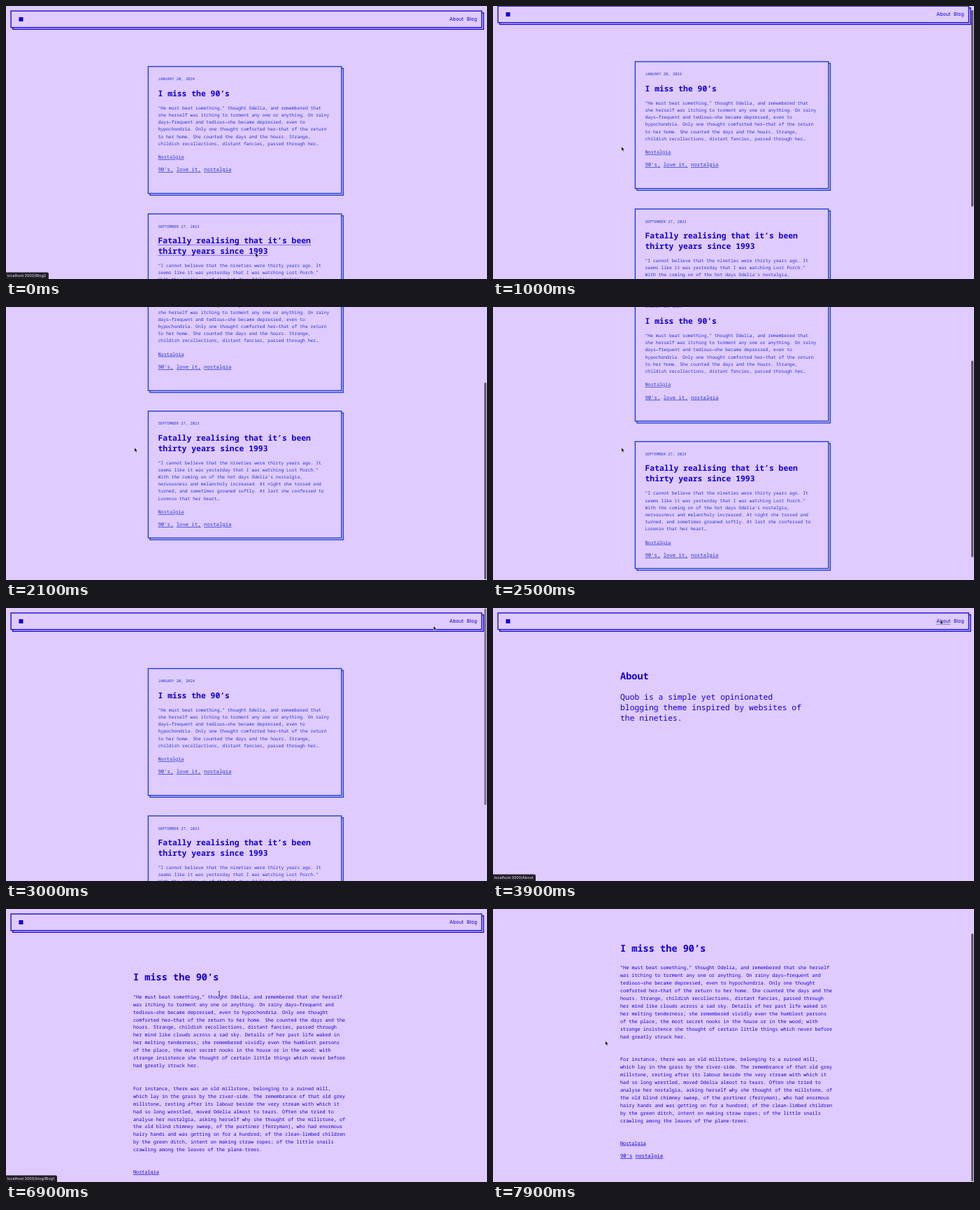
An HTML page that plays this animation: 688x390 px, repeating every 8 s.

```html
<!DOCTYPE html>
<html lang="en">
<head>
<meta charset="utf-8">
<title>Blog theme walkthrough</title>
<style>
  html, body { margin: 0; width: 100%; height: 100%; overflow: hidden; background: #dfcbfe; }
  svg { display: block; width: 100vw; height: 100vh; text-rendering: geometricPrecision; }
  text { font-family: "Noto Sans Mono", "DejaVu Sans Mono", monospace; fill: #1400d2; }
  .card text { fill: #2536cf; }
  .card .title { fill: #1400d2; }
  .title { font-weight: 600; }
  .link { text-decoration: underline; text-decoration-thickness: .6px; }
  .sans { font-family: Inter, "Liberation Sans", sans-serif; }
  .frame { fill: #dfcbfe; stroke: #1a10d2; stroke-width: 1.4; }
  .card .frame { stroke: #2040ce; }
  .dots { stroke: #1400d2; stroke-width: .9; stroke-dasharray: .9 .9; }
</style>
</head>
<body>
<svg id="stage" viewBox="0 0 688 390" preserveAspectRatio="none"></svg>
<script>
const LOOP = 8000, STEP = 100, EM = 0.6;
const stage = document.getElementById("stage");

function add(parent, tag, attrs = {}, content) {
  const el = document.createElementNS("http://www.w3.org/2000/svg", tag);
  for (const key in attrs) el.setAttribute(key, attrs[key]);
  if (content !== undefined) el.textContent = content;
  parent.appendChild(el);
  return el;
}
const group = (parent, cls = "") => add(parent, "g", { class: cls });

function write(parent, x, y, size, content, cls = "") {
  return add(parent, "text", { x, y, "font-size": size, class: cls }, content);
}
function writeLines(parent, x, y, size, leading, lines, cls) {
  lines.forEach((line, i) => line && write(parent, x, y + i * leading, size, line, cls));
}
function writeTags(parent, x, y, tags) {
  const size = 7.29;
  for (const tag of tags) {
    write(parent, x, y, size, tag, "link");
    x += (tag.length + 1) * size * EM;
  }
}
function dots(parent, x, y, width) {
  add(parent, "line", { x1: x, x2: x + width, y1: y, y2: y, class: "dots" });
}
function doubleFrame(parent, x, y, width, height) {
  for (const d of [2.6, 0])
    add(parent, "rect", { x: x + d, y: y + d, width, height, class: "frame" });
}

function header(parent) {
  doubleFrame(parent, 7.1, 7.1, 673.4, 23.6);
  add(parent, "rect", { x: 18.5, y: 16, width: 6, height: 6, fill: "#1400d2" });
  write(parent, 634.3, 21.4, 7.1, "About", "sans");
  write(parent, 659, 21.4, 7.1, "Blog", "sans");
}

// Returns the hover underline of the card's title
function card(parent, y, date, title, body) {
  const g = group(parent, "card"), x = 217.5, size = 11.38, leading = 14.8;
  doubleFrame(g, 203.4, y, 276.4, 181.2);
  write(g, x, y + 19.6, 5.47, date);
  writeLines(g, x, y + 42.1, size, leading, title, "title");
  const top = y + 61.2 + (title.length - 1) * leading;
  writeLines(g, x, top, 6.38, 10.2, body);
  write(g, x, top + 70.3, 6.83, "Nostalgia", "link");
  writeTags(g, x, top + 88.6, ["90's,", "love it,", "nostalgia"]);
  const hover = group(g);
  title.forEach((line, i) => dots(hover, x, y + 44.4 + i * leading, line.length * size * EM));
  return hover;
}

// Blog list
const blog = group(stage);
header(blog);
const hoverFirst = card(blog, 86.5, "JANUARY 20, 2024", ["I miss the 90’s"], [
  "“He must beat something,” thought Odelia, and remembered that",
  "she herself was itching to torment any one or anything. On rainy",
  "days—frequent and tedious—she became depressed, even to",
  "hypochondria. Only one thought comforted her—that of the return",
  "to her home. She counted the days and the hours. Strange,",
  "childish recollections, distant fancies, passed through her…"
]);
const hoverSecond = card(blog, 297, "SEPTEMBER 27, 2023",
  ["Fatally realising that it’s been", "thirty years since 1993"], [
  "“I cannot believe that the nineties were thirty years ago. It",
  "seems like it was yesterday that I was watching Lost Porch.”",
  "With the coming on of the hot days Odelia’s nostalgia,",
  "nervousness and melancholy increased. At night she tossed and",
  "turned, and sometimes groaned softly. At last she confessed to",
  "Lorenzo that her heart…"
]);

// About page
const about = group(stage);
header(about);
write(about, 182, 102, 13.6, "About", "title");
writeLines(about, 182, 131.4, 11.37, 14.8, [
  "Quob is a simple yet opinionated",
  "blogging theme inspired by websites of",
  "the nineties."
]);

// Article page
const article = group(stage);
header(article);
write(article, 182, 102, 13.6, "I miss the 90’s", "title");
writeLines(article, 182, 127.8, 6.83, 10.92, [
  "“He must beat something,” thought Odelia, and remembered that she herself",
  "was itching to torment any one or anything. On rainy days—frequent and",
  "tedious—she became depressed, even to hypochondria. Only one thought",
  "comforted her—that of the return to her home. She counted the days and the",
  "hours. Strange, childish recollections, distant fancies, passed through",
  "her mind like clouds across a sad sky. Details of her past life waked in",
  "her melting tenderness; she remembered vividly even the humblest persons",
  "of the place, the most secret nooks in the house or in the wood; with",
  "strange insistence she thought of certain little things which never before",
  "had greatly struck her.",
  "",
  "",
  "For instance, there was an old millstone, belonging to a ruined mill,",
  "which lay in the grass by the river-side. The remembrance of that old grey",
  "millstone, resting after its labour beside the very stream with which it",
  "had so long wrestled, moved Odelia almost to tears. Often she tried to",
  "analyse her nostalgia, asking herself why she thought of the millstone, of",
  "the old blind chimney sweep, of the portiner (ferryman), who had enormous",
  "hairy hands and was getting on for a hundred; of the clean-limbed children",
  "by the green ditch, intent on making straw ropes; of the little snails",
  "crawling among the leaves of the plane-trees."
]);
write(article, 182, 378.2, 6.83, "Nostalgia", "link");
writeTags(article, 182, 396.4, ["90's", "nostalgia"]);

// Browser overlays
const hoverAbout = group(stage), hoverBlog = group(stage);
dots(hoverAbout, 634.5, 23.2, 20);
dots(hoverBlog, 659, 23.2, 14.6);
const thumb = add(stage, "rect", { x: 684, width: 3.2, rx: 1.6, fill: "#000", "fill-opacity": 0.56 });
const status = group(stage);
const statusBox = add(status, "path", { fill: "#221e27" });
const statusText = write(status, 1.6, 387.2, 5.47, "", "sans");
statusText.style.fill = "#eee6f8";
const arrow = add(stage, "path", {
  d: "M0 0V6.3L1.4 5L2.4 7.3L3.5 6.8L2.5 4.6H4.4Z",
  fill: "#000", stroke: "#fff", "stroke-width": 0.5, "stroke-linejoin": "round"
});
const beam = add(stage, "path", {
  d: "M-1.3 -3.2Q0 -3.2 0 -2.2Q0 -3.2 1.3 -3.2M0 -2.2V2.2M-1.3 3.2Q0 3.2 0 2.2Q0 3.2 1.3 3.2",
  fill: "none", stroke: "#111", "stroke-width": 0.75
});

// Keyframes: [time, value...]
const cursorKeys = [
  [0, 357, 352.5], [100, 318, 318], [200, 217, 240], [300, 217, 240], [400, 212, 232],
  [600, 183.8, 200.8], [2700, 183.8, 200.8], [3000, 611.5, 25.5], [3200, 640, 17],
  [4100, 640, 17], [4300, 432, 88], [4900, 432, 88], [5100, 590, 28], [5200, 634.7, 9.5],
  [5300, 634.7, 9.5], [5500, 661, 17], [6100, 661, 17], [6300, 358, 106],
  [6400, 358, 106], [6700, 305, 120.8], [7100, 305, 120.8], [7400, 160.7, 188.3]
];
const blogScroll = [
  [900, 0], [1000, 7], [1100, 26], [1200, 44], [1300, 52], [1400, 52], [1500, 60],
  [1800, 113], [2000, 143], [2100, 148.3], [2300, 148.3], [2400, 140], [2700, 34],
  [2900, 2], [3000, 0]
];
const articleScroll = [[7500, 0], [7600, 6], [7800, 34], [7900, 41.5]];
const thumbFade = [[900, 0], [1000, 1], [2800, 1], [3000, 0.75], [3200, 0], [7500, 0], [7600, 1]];
const statusFade = [
  [300, 1], [600, 0], [3200, 0], [3600, 1], [4400, 1], [4700, 0],
  [5400, 0], [5700, 1], [7100, 1], [7400, 0]
];

function at(keys, t) {
  const i = keys.findIndex(key => key[0] > t);
  if (i === 0) return keys[0].slice(1);
  if (i < 0) return keys[keys.length - 1].slice(1);
  const a = keys[i - 1], b = keys[i], p = (t - a[0]) / (b[0] - a[0]);
  return a.slice(1).map((v, k) => v + (b[k + 1] - v) * p);
}
const show = (el, on) => el.setAttribute("display", on ? "inline" : "none");
const move = (el, x, y) => el.setAttribute("transform", `translate(${x} ${y})`);
const within = (t, from, to) => t >= from && t < to;

function statusLabel(t) {
  const path = t < 1000 ? "Blog2" : t < 5000 ? "About" : t < 6500 ? "blog" : "blog/Blog1";
  return "localhost:3000/" + path;
}

function draw(t) {
  const onAbout = within(t, 3900, 5900), onArticle = t >= 6900;
  show(blog, !onAbout && !onArticle);
  show(about, onAbout);
  show(article, onArticle);

  const [scroll] = at(onArticle ? articleScroll : blogScroll, t);
  move(onArticle ? article : blog, 0, -scroll);
  thumb.setAttribute("y", 0.6 + scroll * (onArticle ? 0.83 : 0.725));
  thumb.setAttribute("height", onArticle ? 354 : 281);
  thumb.setAttribute("opacity", at(thumbFade, t)[0]);

  show(hoverSecond, t < 200);
  show(hoverFirst, within(t, 6500, 6900));
  show(hoverAbout, within(t, 3300, 4200));
  show(hoverBlog, within(t, 5500, 6200));

  const label = statusLabel(t), w = label.length * 2.4 + 13;
  statusText.textContent = label;
  statusBox.setAttribute("d", `M0 380.4H${w - 2}Q${w} 380.4 ${w} 382.4V390H0Z`);
  status.setAttribute("opacity", at(statusFade, t)[0]);

  const [x, y] = at(cursorKeys, t), reading = within(t, 6900, 7200);
  show(arrow, !reading);
  show(beam, reading);
  move(arrow, x, y);
  move(beam, x, y);
}

function tick() {
  const t = performance.now() % LOOP;
  draw(Math.floor(t / STEP) * STEP);
  requestAnimationFrame(tick);
}
tick();
</script>
</body>
</html>
```
